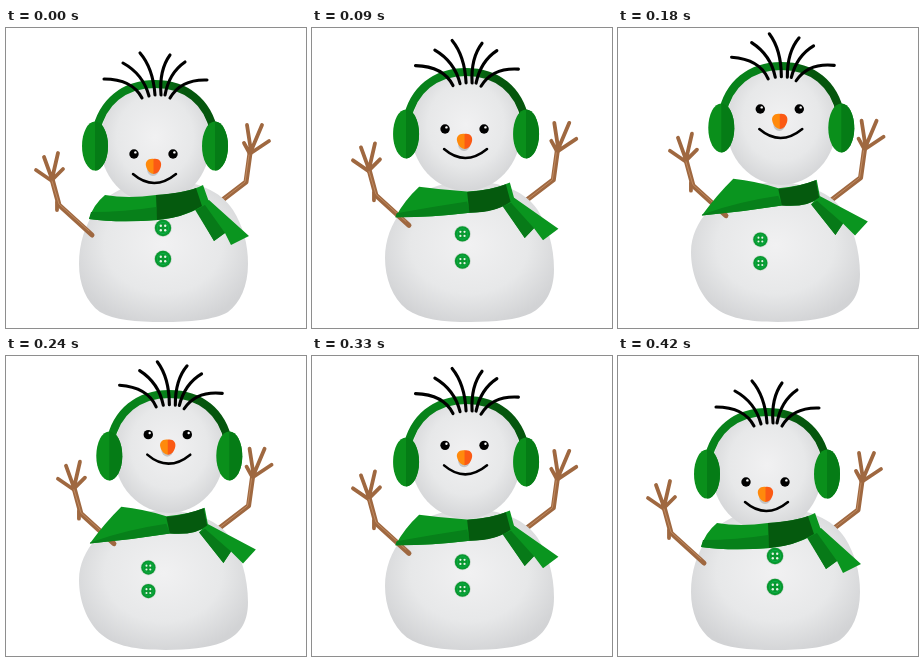
These frames come from a looping animation (300x300 px, 450 ms). An HTML page:

```html
<!DOCTYPE html>
<html lang="en">
<head>
<meta charset="utf-8">
<title>Snowman</title>
<style>
  html, body { margin: 0; width: 100%; height: 100%; overflow: hidden; background: #fff; }
  svg { display: block; width: 100vw; height: 100vh; }
  .line { fill: none; stroke: #000; stroke-linecap: round; }
  .twig { fill: none; stroke: #9f6840; stroke-linecap: round; stroke-linejoin: round; }
  .grain { fill: none; stroke: #c08a60; stroke-width: 1; stroke-linecap: round; }
</style>
</head>
<body>
<svg viewBox="0 0 300 300">
  <defs>
    <radialGradient id="snow" cx=".5" cy=".45" r=".58">
      <stop offset="0" stop-color="#f1f1f2"/>
      <stop offset=".6" stop-color="#e7e8e9"/>
      <stop offset="1" stop-color="#d2d3d5"/>
    </radialGradient>
    <linearGradient id="band">
      <stop offset=".45" stop-color="#07821a"/>
      <stop offset=".75" stop-color="#05560d"/>
    </linearGradient>
    <g id="button">
      <circle r="9" fill="#d3dcd5"/>
      <circle r="8.2" fill="#08982f"/>
      <circle r="5.6" fill="none" stroke="#0bb04a" stroke-width=".9"/>
      <g fill="#e8f5e8">
        <circle cx="-2.2" cy="-2.2" r="1.2"/><circle cx="2.2" cy="-2.2" r="1.2"/>
        <circle cx="-2.2" cy="2.2" r="1.2"/><circle cx="2.2" cy="2.2" r="1.2"/>
      </g>
    </g>
    <g id="muff">
      <ellipse rx="13" ry="24.5" fill="#0a8f1b"/>
      <path d="M0-24.5A13 24.5 0 0 1 0 24.5Z" fill="#057c16"/>
    </g>
    <g id="eye">
      <circle r="4.7"/>
      <circle cx="1.4" cy="-1.6" r="1.2" fill="#fff"/>
    </g>
  </defs>

  <g id="rightArm">
    <path class="twig" stroke-width="5" d="M206 180L240 154L244 125"/>
    <path class="twig" stroke-width="3.8" d="M244 126L238 115M245 123L241 97M245 123L256 97M245 125L263 113"/>
    <path class="grain" d="M211 176L239 154L243 127"/>
  </g>

  <path id="body" fill="url(#snow)"/>

  <use id="button1" href="#button"/>
  <use id="button2" href="#button"/>

  <g id="leftArm">
    <path class="twig" stroke-width="5" d="M86 207L53 177L46 151"/>
    <path class="twig" stroke-width="3.8" d="M46 153L30 142M46 151L38 129M46 151L52 125M47 151L57 141M51 174L51 182"/>
    <path class="grain" d="M83 203L53 176L46 153"/>
  </g>

  <g id="head">
    <ellipse cx="149" cy="115" rx="55" ry="60" fill="url(#snow)"/>
    <path fill="none" stroke="url(#band)" stroke-width="8" d="M90 104C96 74 118 56 149 56S202 74 208 104"/>
    <use href="#muff" x="89" y="118"/>
    <use href="#muff" x="209" y="118"/>
    <path id="hair" class="line" stroke-width="3.1" d="M136 70Q126 51 98 51M143 68Q137 46 117 35M149 67Q147 40 134 25M155 67Q153 42 164 27M159 67Q163 45 179 34M164 70Q175 51 201 52"/>
  </g>

  <g id="face">
    <use href="#eye" x="128" y="126"/>
    <use href="#eye" x="167" y="126"/>
    <ellipse cx="147" cy="141" rx="6" ry="7" fill="#c3c4c6"/>
    <path fill="#ff8a0c" d="M148 131C142 130 139 134 140 138C141 143 145 146 148 146Z"/>
    <path fill="#fb5a14" d="M147.5 131C153 130 156 134 155 138C154 143 151 146 147.5 146Z"/>
    <path class="line" stroke-width="2.5" d="M127 146Q148 164 170 146"/>
  </g>

  <path id="tail" fill="#0a951f"/>
  <path id="fold" fill="#077a18"/>
  <path id="wrap" fill="#0a951f"/>
  <path id="crease" fill="#07801a"/>
  <path id="knot" fill="#055a0e"/>
</svg>
<script>
const LOOP = 450, STEP = 30, HALF = 210;
const el = id => document.getElementById(id);
const mix = (a, b, k) => a + (b - a) * k;
const move = (id, x, y, extra = '') =>
  el(id).setAttribute('transform', `translate(${x} ${y})${extra}`);

// Each soft part bends between a resting and a raised outline.
const soft = {
  body: ['M158 152C190 152 215 163 227 182C237 198 242 216 242 236C242 258 234 275 222 284C208 292 184 294 157 294C130 294 108 292 94 284C80 274 73 256 73 236C73 216 79 196 90 182C103 163 128 152 158 152Z',
         'M158 155C190 155 213 166 224 182C234 198 242 222 242 248C242 270 232 281 215 287C200 292 182 294 160 294C130 294 110 290 96 278C80 264 73 241 73 222C73 207 80 194 90 183C103 165 128 155 158 155Z'],
  tail: ['M188 178L203 172L243 208L225 217L219 205L208 213Z',
         'M194 176L201 167L251 191L239 206L226 194L219 206Z'],
  fold: ['M188 180L199 177L219 205L208 213Z',
         'M194 176L199 172L226 194L219 206Z'],
  wrap: ['M99 167Q122 171 150 167Q181 165 197 157L203 174Q182 189 152 192Q112 195 83 191Q87 177 99 167Z',
         'M118 148Q140 150 162 159Q182 158 199 151L202 169Q190 178 166 175Q125 182 84 187Q100 166 118 148Z'],
  crease: ['M85 184Q118 184 150 179L152 192Q112 195 83 191Z',
           'M84 187Q120 172 162 166L166 175Q125 182 84 187Z'],
  knot: ['M150 167Q178 165 190 160L196 178Q177 190 151 192Z',
         'M162 160Q180 158 199 151L202 168Q191 178 166 175Z']
};
const blend = ([a, b], k) => {
  const end = b.match(/\d+/g);
  let i = 0;
  return a.replace(/\d+/g, n => mix(+n, +end[i++], k).toFixed(2));
};

// The face rises with the head and drops back late.
const lift = [[0, 0], [60, 15], [90, 25], [180, 45], [225, 48], [270, 46], [360, 32], [420, 0], [450, 0]];
const along = (keys, t) => {
  const i = Math.max(1, keys.findIndex(k => k[0] >= t));
  const [t0, a] = keys[i - 1], [t1, b] = keys[i];
  return mix(a, b, (t - t0) / (t1 - t0));
};

function draw(time) {
  const t = Math.floor((time % LOOP) / STEP) * STEP;
  const k = Math.max(0, 1 - Math.abs(t - HALF) / HALF);
  const wave = Math.sin(k * Math.PI / 2);
  const sway = k ** 1.5;
  const buttonX = 157 - 15.3 * wave ** 1.8;
  const shrink = ` scale(${1 - 0.15 * k})`;

  move('head', 18 * sway, -18.5 * wave ** 0.9);
  el('hair').setAttribute('transform', `rotate(${5 * sway} 152 68)`);
  move('face', 18 * sway, -along(lift, t));
  move('leftArm', 25.6 * k, -22.5 * k);
  move('rightArm', 3 * k, -5 * k);
  move('button1', buttonX, 200 + 12 * wave ** 1.5, shrink);
  move('button2', buttonX, 231 + 4.2 * wave ** 1.5, shrink);
  for (const id in soft) el(id).setAttribute('d', blend(soft[id], k));
}

const start = performance.now();
function tick() {
  draw(performance.now() - start);
  requestAnimationFrame(tick);
}
draw(0);
requestAnimationFrame(tick);
</script>
</body>
</html>
```
